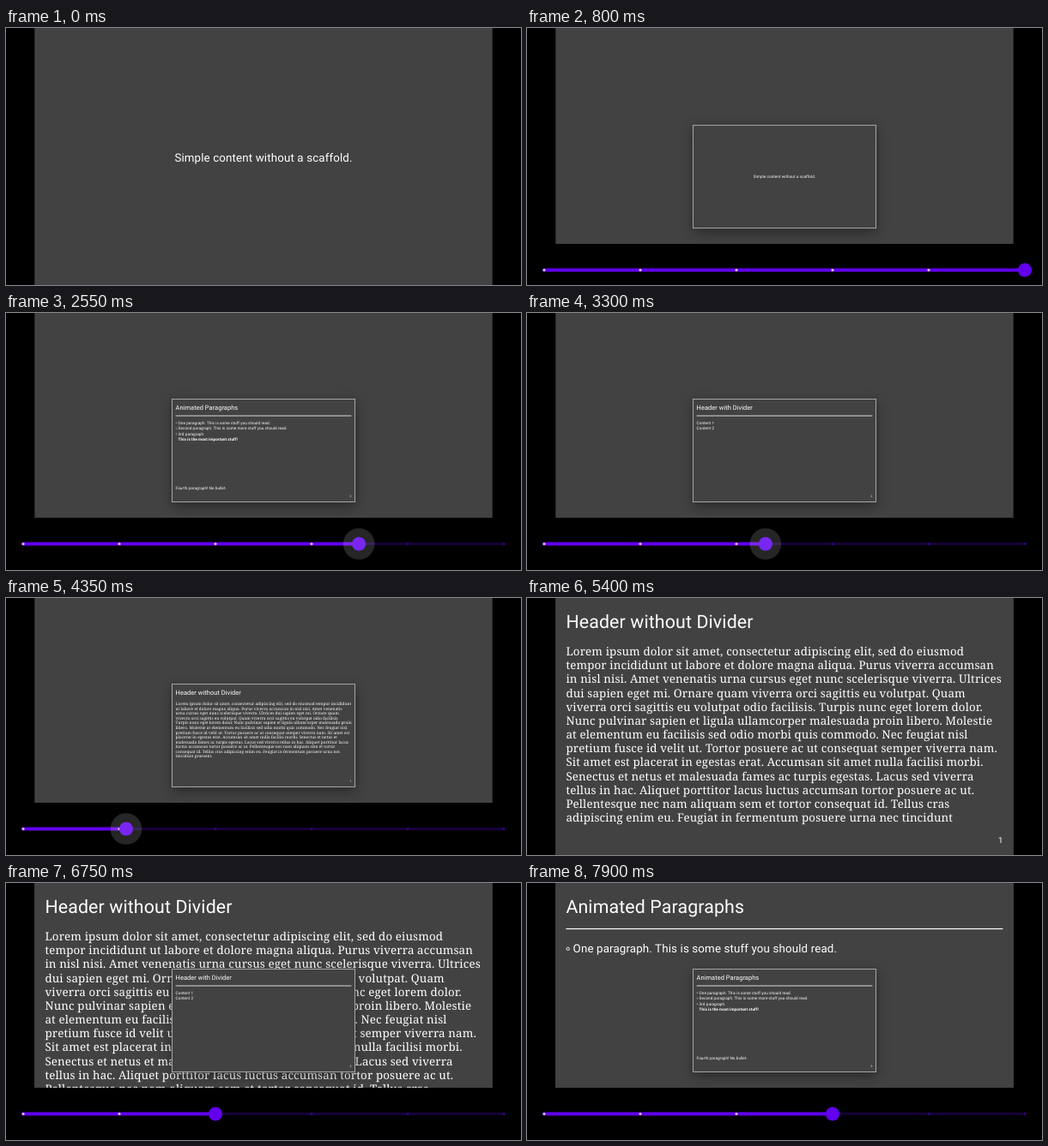
These frames come from a looping animation (600x300 px, 8000 ms). An HTML page with a canvas:

```html
<!DOCTYPE html>
<html lang="en">
<head>
<meta charset="utf-8">
<title>Slide deck navigation</title>
<style>
html, body { margin: 0; width: 100%; height: 100%; overflow: hidden; background: #000; }
canvas { display: block; }
</style>
</head>
<body>
<canvas id="stage" width="600" height="300"></canvas>
<script>
const ctx = document.getElementById('stage').getContext('2d');
const LOOP = 8000;
const SANS = 'Roboto, sans-serif';
const SERIF = '"Noto Serif", serif';
const ACCENT = '#6200ee';

// Geometry and text scale of the full slide and of the preview card
const FULL = {
  box: [33.3, 0, 533.4, 300], x: 45.4, right: 554.4, indent: 8.2, font: 1,
  head: 35, rule: 53.5, ruleWidth: 1.2, body: 67, lead: 16.17,
  list: 81.2, pitch: 16.3, foot: 268, num: 286, mid: 155.5
};
const CARD = {
  box: [193.5, 100.5, 213, 120], x: 197.6, right: 402.4, indent: 3, font: .35,
  head: 113.2, rule: 120, ruleWidth: .8, body: 125.2, lead: 5.55,
  list: 129.8, pitch: 6.45, foot: 205.7, num: 215, mid: 162.4
};

const LOREM = `Lorem ipsum dolor sit amet, consectetur adipiscing elit, sed do eiusmod
tempor incididunt ut labore et dolore magna aliqua. Purus viverra accumsan
in nisl nisi. Amet venenatis urna cursus eget nunc scelerisque viverra. Ultrices
dui sapien eget mi. Ornare quam viverra orci sagittis eu volutpat. Quam
viverra orci sagittis eu volutpat odio facilisis. Turpis nunc eget lorem dolor.
Nunc pulvinar sapien et ligula ullamcorper malesuada proin libero. Molestie
at elementum eu facilisis sed odio morbi quis commodo. Nec feugiat nisl
pretium fusce id velit ut. Tortor posuere ac ut consequat semper viverra nam.
Sit amet est placerat in egestas erat. Accumsan sit amet nulla facilisi morbi.
Senectus et netus et malesuada fames ac turpis egestas. Lacus sed viverra
tellus in hac. Aliquet porttitor lacus luctus accumsan tortor posuere ac ut.
Pellentesque nec nam aliquam sem et tortor consequat id. Tellus cras
adipiscing enim eu. Feugiat in fermentum posuere urna nec tincidunt
praesent.`;

const clamp = v => Math.max(0, Math.min(1, v));
const ramp = (t, from, to) => clamp((t - from) / (to - from));
const easeOut = p => 1 - (1 - p) ** 3;

function path(t, keys) {
  let i = 1;
  while (i < keys.length - 1 && t > keys[i][0]) i++;
  const [[t0, v0], [t1, v1]] = [keys[i - 1], keys[i]];
  return v0 + (v1 - v0) * ramp(t, t0, t1);
}

function text(str, x, y, size, { family = SANS, weight = 400, align = 'left', spacing = .01 } = {}) {
  ctx.font = `${weight} ${size}px ${family}`;
  ctx.letterSpacing = size * spacing + 'px';
  ctx.textAlign = align;
  ctx.fillText(str, x, y);
}

function disc(x, y, r, color) {
  ctx.fillStyle = color;
  ctx.beginPath();
  ctx.arc(x, y, r, 0, Math.PI * 2);
  ctx.fill();
}

function wrap(str, width, size) {
  ctx.font = `400 ${size}px ${SERIF}`;
  ctx.letterSpacing = size * .01 + 'px';
  const lines = [''];
  for (const word of str.split(/\s+/)) {
    const last = lines.length - 1;
    const joined = lines[last] ? lines[last] + ' ' + word : word;
    if (ctx.measureText(joined).width > width) lines.push(word);
    else lines[last] = joined;
  }
  return lines;
}

function header(g, title, ruled) {
  text(title, g.x, g.head, 21.33 * g.font, { spacing: .006 });
  if (ruled) ctx.fillRect(g.x, g.rule - g.ruleWidth / 2, g.right - g.x, g.ruleWidth);
}

function bullet(g, row, str) {
  const y = g.list + row * g.pitch, r = 1.7 * g.font;
  ctx.lineWidth = .9 * g.font;
  ctx.beginPath();
  ctx.arc(g.x + r + .6 * g.font, y - 4.4 * g.font, r, 0, Math.PI * 2);
  ctx.stroke();
  text(str, g.x + g.indent, y, 13.33 * g.font);
}

const pages = {
  1(g, size) {
    header(g, 'Header without Divider');
    const lines = g === FULL ? LOREM.split('\n').slice(0, 13) : wrap(LOREM, g.right - g.x + .6, size);
    lines.forEach((line, i) => text(line, g.x, g.body + i * g.lead, size, { family: SERIF }));
  },
  2(g, size) {
    header(g, 'Header with Divider', true);
    ['Content 1', 'Content 2'].forEach((line, i) => text(line, g.x, g.list + i * g.pitch, size));
  },
  3(g, size) {
    header(g, 'Animated Paragraphs', true);
    bullet(g, 0, 'One paragraph. This is some stuff you should read.');
    if (g === FULL) return;
    bullet(g, 1, 'Second paragraph. This is some more stuff you should read.');
    bullet(g, 2, '3rd paragraph.');
    text('This is the most important stuff!', g.x + g.indent, g.list + 3 * g.pitch, size, { weight: 700 });
    text('Fourth paragraph! No bullet.', g.x, g.foot, size);
  },
  5(g, size) {
    text('Simple content without a scaffold.', 300, g.mid, size, { align: 'center' });
  }
};

function slide(g, page, alpha = 1) {
  ctx.save();
  ctx.globalAlpha = alpha;
  ctx.fillStyle = '#424242';
  ctx.fillRect(...g.box);
  ctx.fillStyle = ctx.strokeStyle = '#fff';
  pages[page](g, 13.33 * g.font);
  if (page < 5) text(page, g.right, g.num, 9.6 * g.font, { align: 'right' });
  ctx.restore();
}

function card(page) {
  ctx.save();
  ctx.shadowColor = 'rgba(0,0,0,.4)';
  ctx.shadowBlur = 14;
  ctx.shadowOffsetY = 4;
  ctx.fillStyle = '#424242';
  ctx.fillRect(...CARD.box);
  ctx.restore();
  slide(CARD, page);
  ctx.strokeStyle = '#a6a6a6';
  ctx.lineWidth = 1;
  ctx.strokeRect(...CARD.box);
}

function slider(x, halo) {
  const y = 269.5;
  ctx.fillStyle = '#000';
  ctx.fillRect(0, 239, 600, 61);
  ctx.fillStyle = '#170039';
  ctx.fillRect(x, y - 1.5, 581.5 - x, 3);
  ctx.fillStyle = ACCENT;
  ctx.fillRect(18.5, y - 2, x - 18.5, 4);
  for (let i = 0; i < 6; i++) {
    const tick = 20 + i * 112;
    disc(tick, y, 1.6, tick < x ? '#dcbcec' : '#350081');
  }
  disc(x, y, 8, ACCENT);
  if (halo) disc(x, y, 18.3, `rgba(255,255,255,${.15 * halo})`);
}

function thumbAt(t) {
  if (t < 1900) return 580;
  if (t < 4450) return path(t, [[1900, 569], [2700, 375], [3300, 278], [3550, 250], [4350, 140], [4450, 136]]);
  if (t < 6740) return 132;
  return path(t, [[7150, 244], [7225, 356]]);
}

function draw(t) {
  ctx.fillStyle = '#000';
  ctx.fillRect(0, 0, 600, 300);

  // Main slide, each page fading in over the one before
  slide(FULL, t < 4850 ? 5 : t < 7100 ? 1 : 2);
  for (const [page, from, to] of [[1, 4550, 4850], [2, 6780, 7080], [3, 7180, 7480]]) {
    const alpha = ramp(t, from, to);
    if (alpha) slide(FULL, page, alpha);
  }

  // Preview and slider rise together from the bottom edge
  const shown = t < 4850 ? easeOut(ramp(t, 650, 900))
    : t < 5400 ? 1 - ramp(t, 4850, 5150) ** 2
    : easeOut(ramp(t, 5500, 5750));
  if (!shown) return;
  const x = thumbAt(t);
  const index = Math.round((x - 20) / 112);
  ctx.save();
  ctx.translate(0, (1 - shown) * 210);
  card(index === 4 ? 3 : index);
  slider(x, ramp(t, 1900, 2000) * (1 - ramp(t, 4450, 4550)));
  ctx.restore();
}

ctx.textRendering = 'geometricPrecision';
const start = performance.now();
function tick() {
  draw((performance.now() - start) % LOOP);
  requestAnimationFrame(tick);
}
tick();
</script>
</body>
</html>
```
